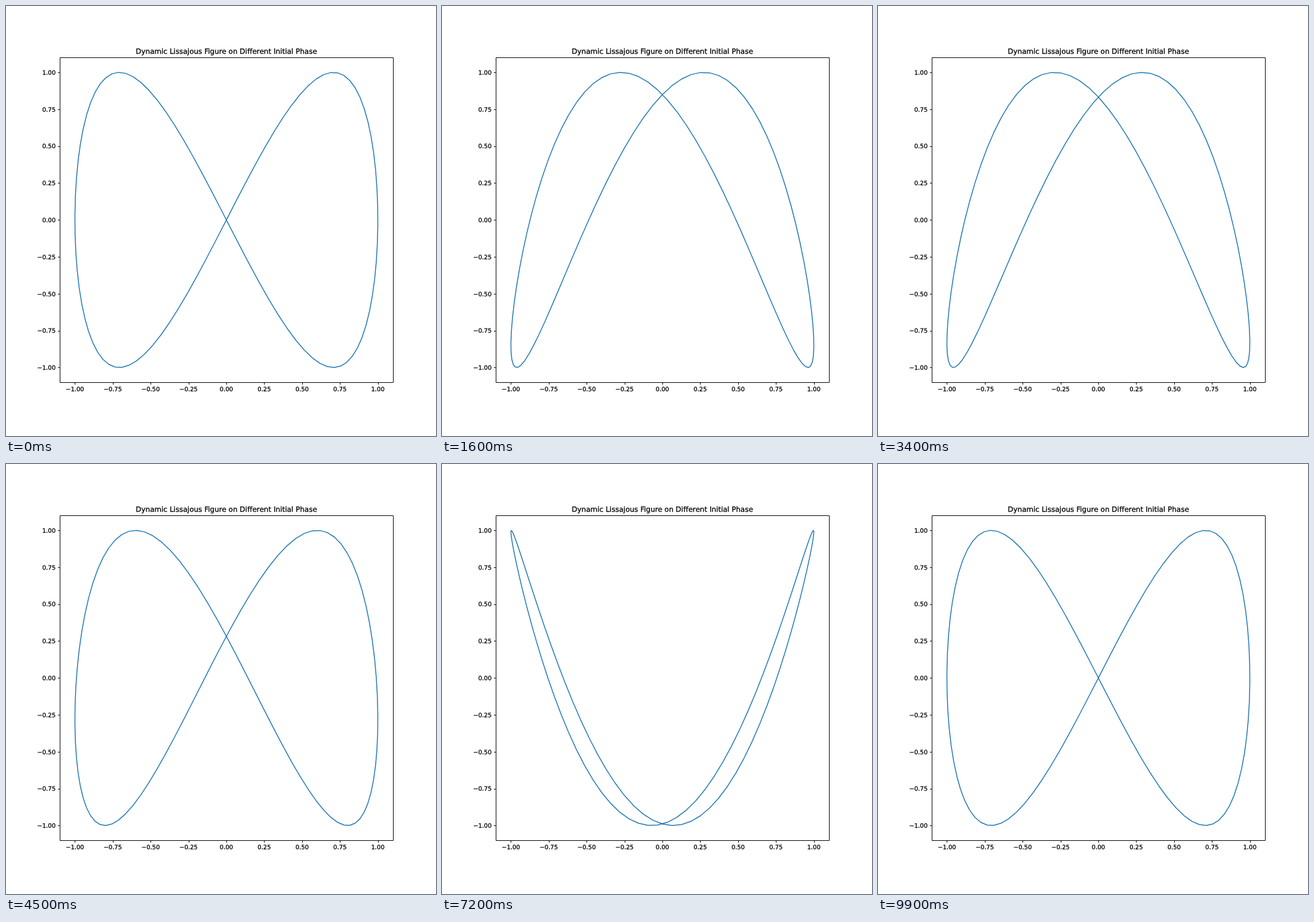
Animation, 720 px wide and 720 px high, one loop 10 s. Source, as an HTML page:

```html
<!DOCTYPE html>
<html lang="en">
<head>
<meta charset="utf-8">
<title>Lissajous figure</title>
<style>
  html, body { margin: 0; width: 100%; height: 100%; overflow: hidden; background: #fff; }
  svg { display: block; width: 720px; height: 720px; }
  text {
    font-family: "DejaVu Sans", Verdana, sans-serif;
    font-size: 10px;
    font-variant-ligatures: none;
    text-rendering: geometricPrecision;
    stroke: #000;
    stroke-width: 0.3px;
  }
  .title { font-size: 12px; }
  .axes { fill: none; stroke: #000; stroke-width: 1; }
  .curve { fill: none; stroke: #1f77b4; stroke-width: 1.5; stroke-linejoin: round; stroke-linecap: square; }
</style>
</head>
<body>
<svg viewBox="0 0 720 720">
  <path class="curve" id="curve"/>
  <path class="axes" id="axes"/>
  <g id="labels" text-anchor="middle">
    <text class="title" x="369" y="80">Dynamic Lissajous Figure on Different Initial Phase</text>
  </g>
</svg>
<script>
  const STEPS = 100, STEP_MS = 100, POINTS = 100;
  const LEFT = 90, RIGHT = 648, TOP = 86.4, BOTTOM = 630, LIMIT = 1.1;
  const $ = id => document.getElementById(id);

  const px = v => (LEFT + RIGHT) / 2 + v * (RIGHT - LEFT) / (2 * LIMIT);
  const py = v => (TOP + BOTTOM) / 2 - v * (BOTTOM - TOP) / (2 * LIMIT);
  const snap = v => Math.round(v) + 0.5;
  const angle = (i, n) => 2 * Math.PI * i / (n - 1);

  function addLabel(text, x, y, anchor) {
    const el = document.createElementNS("http://www.w3.org/2000/svg", "text");
    el.setAttribute("x", x);
    el.setAttribute("y", y);
    el.setAttribute("text-anchor", anchor);
    el.textContent = text;
    $("labels").append(el);
  }

  function drawAxes() {
    let d = `M${snap(LEFT)} ${snap(TOP)}H${snap(RIGHT)}V${snap(BOTTOM)}H${snap(LEFT)}Z`;
    for (let i = -4; i <= 4; i++) {
      const v = i / 4;
      const text = (v < 0 ? "\u2212" : "") + Math.abs(v).toFixed(2);
      d += `M${snap(px(v))} ${BOTTOM + 0.5}v3.5M${LEFT + 0.5} ${snap(py(v))}h-3.5`;
      addLabel(text, px(v), 645, "middle");
      addLabel(text, LEFT - 7, Math.round(py(v) + 3.8), "end");
    }
    $("axes").setAttribute("d", d);
  }

  function drawCurve(phase) {
    const points = Array.from({ length: POINTS }, (_, i) => {
      const t = angle(i, POINTS);
      return px(Math.sin(t)).toFixed(2) + " " + py(Math.sin(2 * t + phase)).toFixed(2);
    });
    $("curve").setAttribute("d", "M" + points.join("L"));
  }

  const start = performance.now();
  let shown = -1;

  function tick() {
    const step = Math.floor((performance.now() - start) / STEP_MS) % STEPS;
    if (step !== shown) drawCurve(angle(shown = step, STEPS));
    requestAnimationFrame(tick);
  }

  drawAxes();
  tick();
</script>
</body>
</html>
```
